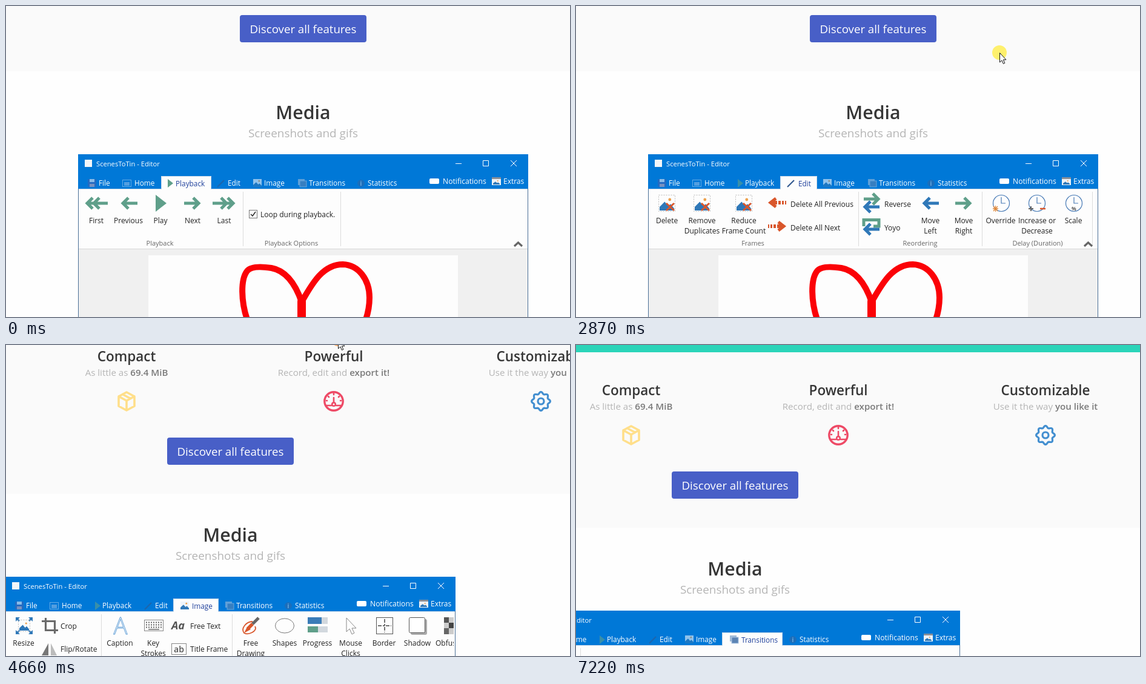
Write an HTML page that moves like this. It is 931 by 514 pixels and loops after 7.7 s.

```html
<!DOCTYPE html>
<html lang="en">
<head>
<meta charset="utf-8">
<title>Media page</title>
<style>
html, body { margin: 0; width: 100%; height: 100%; overflow: hidden; background: #fefefe; }
svg { display: block; font-family: "Open Sans", "Noto Sans", sans-serif; }
</style>
</head>
<body>
<svg id="stage" width="931" height="514" viewBox="0 0 931 514"></svg>
<script>
const GREEN = '#5f9f8a', BLUE = '#2f78b8', ORANGE = '#d9562b', GRAY = '#666', EDGE = '#c9d8e8';

// Drawing helpers, all returning SVG markup
const text = (x, y, s, size = 12, fill = '#222', anchor = 'start', weight = 400) =>
  `<text x="${x}" y="${y}" font-size="${size}" fill="${fill}" text-anchor="${anchor}" font-weight="${weight}">${s}</text>`;
const rect = (x, y, w, h, fill, more = '') =>
  `<rect x="${x}" y="${y}" width="${w}" height="${h}" fill="${fill}" ${more}/>`;
const frame = (x, y, w, h, color, more = '') => rect(x, y, w, h, 'none', `stroke="${color}" ${more}`);
const line = (d, color, width = 1, more = '') =>
  `<path d="${d}" fill="none" stroke="${color}" stroke-width="${width}" ${more}/>`;
const shape = (d, fill) => `<path d="${d}" fill="${fill}"/>`;
const ring = (x, y, r, color, width = 1, fill = 'none') =>
  `<circle cx="${x}" cy="${y}" r="${r}" fill="${fill}" stroke="${color}" stroke-width="${width}"/>`;
const at = (x, y, body, sx = 1, sy = 1) => `<g transform="translate(${x} ${y}) scale(${sx} ${sy})">${body}</g>`;
const label = (x, s) => s.split('|').map((row, i) => text(x, 359 + 17 * i, row, 12, '#222', 'middle')).join('');
const group = (x, s) => text(x, 396, s, 11, GRAY, 'middle');
const divider = x => line(`M${x + .5} 307V397`, '#dcdcdc');

const arrow = (x, y, dir, color) => at(x, y, line('M1-9L10 0L1 9M9 0H-14', color, 5), dir);
const doubleArrow = (x, y, dir) =>
  at(x, y, line('M6-9L15 0L6 9M-5-9L4 0L-5 9M14 0H-19', GREEN, 5), dir);
const dashArrow = (y, dir) => at(332, y,
  line('M2-7L11 0L2 7', ORANGE, 5) + line('M8 0H-15', ORANGE, 6, 'stroke-dasharray="8 2 4 2 3 2"'), dir);
const photo = (x, y, w, h) =>
  shape(`M${x} ${y + h}V${y + h * .75}L${x + w * .35} ${y + h * .4}L${x + w * .6} ${y + h * .7}L${x + w * .75} ${y + h * .55}L${x + w} ${y + h * .85}V${y + h}Z`, BLUE) +
  `<circle cx="${x + w * .7}" cy="${y + h * .25}" r="${w * .1}" fill="#eda24f"/>`;
const dottedPhoto = (x, y, size) =>
  frame(x + .5, y + .5, size - 1, size - 1, '#bbb', 'stroke-dasharray="2 2"') + photo(x + 2, y + 2, size - 4, size - 4);
const deletePhoto = x =>
  dottedPhoto(x - 14, 312, 28) + line(`M${x - 1} 326L${x + 12} 338M${x + 12} 326L${x - 1} 338`, ORANGE, 3);
const clock = x => ring(x, 326, 13.5, '#4679b5', 1.2) + line(`M${x} 316V326H${x + 7}`, '#4679b5', 1.2);

// Tabs: name, text x, box left, box width, icon
const tabs = [
  ['File', 153, 0, 0, rect(135, 286, 14, 13, '#3d63b5') + rect(138, 286, 8, 5, '#e4e9f4') + rect(138, 294, 8, 5, '#c9a3b0')],
  ['Home', 212, 0, 0, frame(192.5, 287.5, 14, 11, '#a9cdf0') + rect(195, 291, 9, 6, '#8ab8e6')],
  ['Playback', 279, 256, 83, shape('M267 286L276 293L267 300Z', GREEN)],
  ['Edit', 366, 337, 61, line('M349 299L360 288', '#31588f', 2.2)],
  ['Image', 426, 396, 75, rect(408, 286, 14, 13, '#eef4fb') + photo(408, 286, 14, 13)],
  ['Transitions', 500, 469, 100, rect(482, 286, 11, 10, '#9fb9d6') + rect(485, 289, 11, 10, '#5c84b4', 'stroke="#a8c4e4"')],
  ['Statistics', 597, 0, 0, ring(586, 293, 5.5, '#2f68a8', 1, '#2f68a8') + text(586, 297, 'i', 10, '#dfe9f5', 'middle', 600)]
];
const idleTab = ([name, x, , , icon]) => `<g opacity=".6">${icon}</g>` + text(x, 297, name, 11.8, '#fff');
const activeTab = ([name, x, left, width, icon]) =>
  rect(left, 281, width, 22, '#fdfdfd') + line(`M${left + .5} 303V281.5H${left + width - .5}V303`, EDGE) +
  icon + text(x + 1, 298, name, 11.8, '#20419c');

const playback =
  doubleArrow(149, 326, -1) + arrow(203, 326, -1, GREEN) + shape('M247 312L265 326L247 340Z', GREEN) +
  arrow(308, 326, 1, GREEN) + doubleArrow(360, 326, 1) +
  label(149, 'First') + label(202, 'Previous') + label(255, 'Play') + label(308, 'Next') + label(360, 'Last') +
  group(254, 'Playback') + divider(391) +
  frame(401.5, 337.5, 13, 13, '#777') + line('M404 344L407 347L412 340', '#333', 1.6) +
  text(420, 349, 'Loop during playback.') + group(471, 'Playback Options') + divider(552);

const edit =
  [150, 208, 277].map(deletePhoto).join('') +
  label(150, 'Delete') + label(208, 'Remove|Duplicates') + label(277, 'Reduce|Frame Count') +
  dashArrow(325, -1) + text(354, 332, 'Delete All Previous') +
  dashArrow(364, 1) + text(354, 371, 'Delete All Next') + group(292, 'Frames') + divider(466) +
  arrow(489, 319, 1, GREEN) + arrow(487, 332, -1, BLUE) + text(509, 332, 'Reverse') +
  line('M475 364V353.5H500V364H491', GREEN, 5) + arrow(487, 369, -1, BLUE) + text(509, 371, 'Yoyo') +
  arrow(585, 326, -1, BLUE) + arrow(640, 326, 1, GREEN) + label(585, 'Move|Left') + label(640, 'Move|Right') +
  group(568, 'Reordering') + divider(670) +
  [702, 761, 822].map(clock).join('') +
  line('M688 335H697M692.5 330V340M689 331L696 339M696 331L689 339', '#e08a3c', 1.3) +
  line('M747 335H755M751 331V339', GRAY, 2) + line('M766 335H775', ORANGE, 2.5) +
  text(822, 338, '%', 9, '#333', 'middle', 600) +
  label(701, 'Override') + label(761, 'Increase or|Decrease') + label(821, 'Scale') +
  group(762, 'Delay (Duration)') + divider(852);

const corner = shape('M-14-14H-7L-9.5-11.5L-7-9L-9-7L-11.5-9.5L-14-7Z', BLUE);
const image =
  at(150, 326, [[1, 1], [-1, 1], [1, -1], [-1, -1]].map(s => at(0, 0, corner, ...s)).join('') + dottedPhoto(-10, -10, 20)) +
  label(149, 'Resize') + line('M185.5 313V333.5H206M179 318.5H200.5V339', '#6a6a6a', 3.2) + text(210, 331, 'Crop') +
  shape('M179 375L190 355V375Z', '#777') + shape('M194 375V355L204 375Z', '#bbb') + text(210, 369, 'Flip/Rotate') +
  group(198, 'Size and Rotation') + divider(277) +
  `<text x="309" y="340" font-size="38" font-weight="300" text-anchor="middle" fill="#fff" stroke="#5b9bd5" stroke-width=".9">A</text>` +
  label(308, 'Caption') + frame(348.5, 316.5, 31, 18, '#888') +
  [320.5, 324.5, 328.5].map(y => line(`M351 ${y}H378`, GRAY, 2, 'stroke-dasharray="2 2"')).join('') +
  line('M355 332H373', GRAY, 1.5) + label(363, 'Key|Strokes') +
  `<g font-style="italic">${text(393, 332, 'Aa', 18, '#555', 'start', 700)}</g>` + text(424, 331, 'Free Text') +
  frame(393.5, 355.5, 24, 18, '#888') + text(405.5, 370, 'ab', 14, '#555', 'middle', 600) + text(424, 369, 'Title Frame') +
  group(385, 'Text') + divider(493) +
  line('M531 327C536 335 520 342 513 338C507 330 517 319 527 319', ORANGE, 1.8) +
  shape('M513 338L518 328L524 332Z', ORANGE) + line('M519 331L527 323', ORANGE, 5.5) + line('M527 323L537 313', GRAY, 5) +
  label(524, 'Free|Drawing') +
  `<ellipse cx="580" cy="326" rx="15.5" ry="12" fill="none" stroke="#777"/>` + label(580, 'Shapes') +
  rect(618, 312, 33, 11, '#d2d8de') + rect(618, 312, 23, 11, '#3a7cb8') +
  rect(618, 327, 33, 10, '#d2d8de') + rect(618, 327, 17, 10, GREEN) + label(634, 'Progress') +
  line('M682 313V336L687 331L691 340L695 338L691 330H698Z', '#888') + label(689, 'Mouse|Clicks') +
  frame(731.5, 312.5, 27, 27, '#555') + line('M745 315V337M734 326H756', '#444', 1.5, 'stroke-dasharray="6 2 3 2"') + label(744, 'Border') +
  rect(788, 315, 27, 26, '#aaa', 'rx="3"') + rect(785.5, 312.5, 26, 25, '#fff', 'rx="2" stroke="#555"') + label(799, 'Shadow') +
  rect(843, 312, 16, 28, '#ccc') + rect(843, 312, 8, 9, '#555') + rect(851, 321, 8, 9, '#444') + rect(843, 330, 8, 10, '#666') +
  `<svg width="859" height="514">${text(829, 359, 'Obfuscate')}</svg>` + group(692, 'Overlay');

const layers = [playback, edit, image, divider(235)];

// Feature column: heading, caption and icon
const feature = (x, title, lead, strong, icon) =>
  text(x, -111, title, 22.5, '#363636', 'middle', 600) +
  text(x, -87, `${lead} <tspan font-weight="600" fill="#7a7a7a">${strong}</tspan>`, 15.1, '#b5b5b5', 'middle') +
  at(x, -45, `<g stroke-linejoin="round" stroke-linecap="round">${icon}</g>`);

const gear = Array.from({ length: 64 }, (_, i) => {
  const a = i * Math.PI / 32, r = 13.8 + 1.6 * Math.cos(8 * a);
  return `${(r * Math.sin(a)).toFixed(1)} ${(-r * Math.cos(a)).toFixed(1)}`;
}).join('L');

const features =
  line('M-7-63C-5-48-8-40-17-38C-32-36-40-45-38-55C-30-55-22-60-7-63ZM-16-40V-29', '#5fa4a0', 3.5) +
  feature(319, 'Compact', 'As little as', '69.4 MiB',
    line('M0-15L13-8V8L0 15L-13 8V-8ZM-13-8L0-1L13-8M0-1V15M-6.5-11.5L6.5-4.5', '#ffdf8a', 3.6)) +
  feature(661, 'Powerful', 'Record, edit and', 'export it!',
    ring(0, 0, 15.2, '#ee4a66', 3.4) + ring(0, 5, 2.8, '#ee4a66', 2.5) +
    line('M0-6V2M-13 7H-4M4 7H13M0-13V-11M-9-8L-8-7M9-8L8-7M-12-1H-11M12-1H11', '#ee4a66', 2.6)) +
  feature(1003, 'Customizable', 'Use it the way', 'you like it',
    line(`M${gear}Z`, '#438fd0', 3.2) + ring(0, 0, 5, '#438fd0', 3.2));

const editor =
  rect(119, 245, 743, 280, '#f0f0f0') + rect(119, 302, 743, 99, '#fdfdfd') +
  line('M119 401.5H862', '#d8d8d8') + line('M119.5 302V520M861.5 302V520', '#4a6f96') +
  rect(119, 245, 743, 57, '#0078d7') + line('M120 302.5H861', EDGE) + rect(130, 254, 12, 12, '#f4f6f8') +
  text(149, 265, 'ScenesToTin - Editor', 11.2, '#fff') +
  line('M742 260.5H752M787.5 255.5H796.5V264.5H787.5ZM833 255L843 265M843 255L833 265', '#fff') +
  rect(699, 285, 16, 9, '#fff', 'rx="2"') + text(721, 294, 'Notifications', 12.2, '#fff') +
  rect(802, 283, 15, 13, '#eef2f6') + rect(802, 283, 15, 3, '#8a8f98') + photo(804, 287, 11, 8) +
  text(821, 294, 'Extras', 12, '#fff') +
  tabs.map(idleTab).join('') +
  layers.map((body, i) => `<g class="layer">${activeTab(tabs[i + 2])}${body}</g>`).join('') +
  line('M839 397L845.5 391L852 397', GRAY, 3.2) +
  rect(235, 412, 511, 110, '#fdfdfd') +
  line('M398 518C388 488 387 452 398 438C405 429 425 431 438 433C466 438 480 466 488 489V520M488 489C502 466 520 427 556 427C582 428 600 452 600 482Q600 500 594 518',
    '#fb0207', 10, 'stroke-linejoin="round"') + line('M488 488V520', '#fb0207', 14, 'stroke-linecap="round"');

const stage = document.getElementById('stage');
stage.innerHTML =
  `<g id="page">${rect(-1000, -1000, 3000, 818, '#2bd4b9')}${rect(-1000, -182, 3000, 290, '#fafafa')}` +
  features + rect(386, 15, 209, 45, '#485fc7', 'rx="4" id="button"') +
  text(490.5, 45, 'Discover all features', 18.7, '#fff', 'middle') +
  text(490.5, 187, 'Media', 30.3, '#363636', 'middle', 600) +
  text(490.5, 217, 'Screenshots and gifs', 18.9, '#b5b5b5', 'middle') + editor + '</g>' +
  '<g id="cursor"><circle id="halo" r="12" opacity=".75"/>' +
  '<path d="M.5.5V16L4 12.8L6.4 18.5L8.8 17.4L6.4 11.8H11Z" fill="#fff" stroke="#111"/></g>';

const [page, button, cursor, halo] = ['page', 'button', 'cursor', 'halo'].map(id => document.getElementById(id));
const layerNodes = stage.querySelectorAll('.layer');

// Keyframes: time, x, y
const cursorPath = [
  [0, 900, 540], [185, 900, 540], [190, 850, 474], [260, 814, 424], [440, 814, 424], [460, 775, 360],
  [670, 598, 116], [850, 598, 116], [870, 590, 117], [1290, 330, 121], [1630, 312, 146], [1690, 365, 178],
  [1760, 425, 211], [1970, 540, 268], [2250, 645, 225], [2460, 686, 145], [2530, 704, 122], [2700, 733, 95],
  [3000, 640, 45], [3280, 560, 27], [3350, 553, 12], [3490, 548, -10], [5260, 548, -10], [5280, 520, 50],
  [5700, 362, 325], [6050, 530, 400], [6235, 530, 400], [6250, 545, 380], [6600, 640, 300], [7020, 833, 462],
  [7090, 848, 482], [7160, 874, 505], [7220, 900, 540], [7700, 900, 540]
];
const panPath = [
  [0, 0, 0], [3770, 0, 0], [4050, 24, 42], [4190, 16, 70], [4330, -42, 101], [4560, -42, 101], [4590, -85, 120],
  [4660, -120, 138], [4940, -211, 191], [5080, -228, 194], [7700, -228, 194]
];
const bursts = [0, 190, 460, 870, 1690, 2530, 3350, 3700, 4590, 5280, 6250, 7090, 7220];
const fades = [1490, 3700, 5910];

function sample(path, t) {
  const i = path.findIndex(k => k[0] > t);
  const [t0, x0, y0] = path[i - 1], [t1, x1, y1] = path[i];
  const p = (t - t0) / (t1 - t0);
  return [x0 + (x1 - x0) * p, y0 + (y1 - y0) * p];
}

function draw(now) {
  const t = now % 7700;
  const start = bursts.filter(b => b <= t).pop();
  const step = start + Math.floor((t - start) / 70) * 70;
  const [cx, cy] = sample(cursorPath, step);
  const [px, py] = sample(panPath, step).map(Math.round);
  page.setAttribute('transform', `translate(${px} ${py})`);
  cursor.setAttribute('transform', `translate(${Math.round(cx)} ${Math.round(cy)})`);
  halo.setAttribute('fill', t >= 3700 && t < 5200 ? '#f5923a' : '#ffec3d');
  const bx = cx - px, by = cy - py;
  button.setAttribute('fill', bx > 386 && bx < 595 && by > 15 && by < 60 ? '#3e56c4' : '#485fc7');
  const level = fades.reduce((sum, f) => sum + Math.max(0, Math.min(3, Math.floor((t - f) / 70) + 1)) / 3, 0);
  layerNodes.forEach((node, i) => node.setAttribute('opacity', Math.max(0, 1 - Math.abs(level - i))));
}

function tick() {
  draw(performance.now());
  requestAnimationFrame(tick);
}
tick();
</script>
</body>
</html>
```
